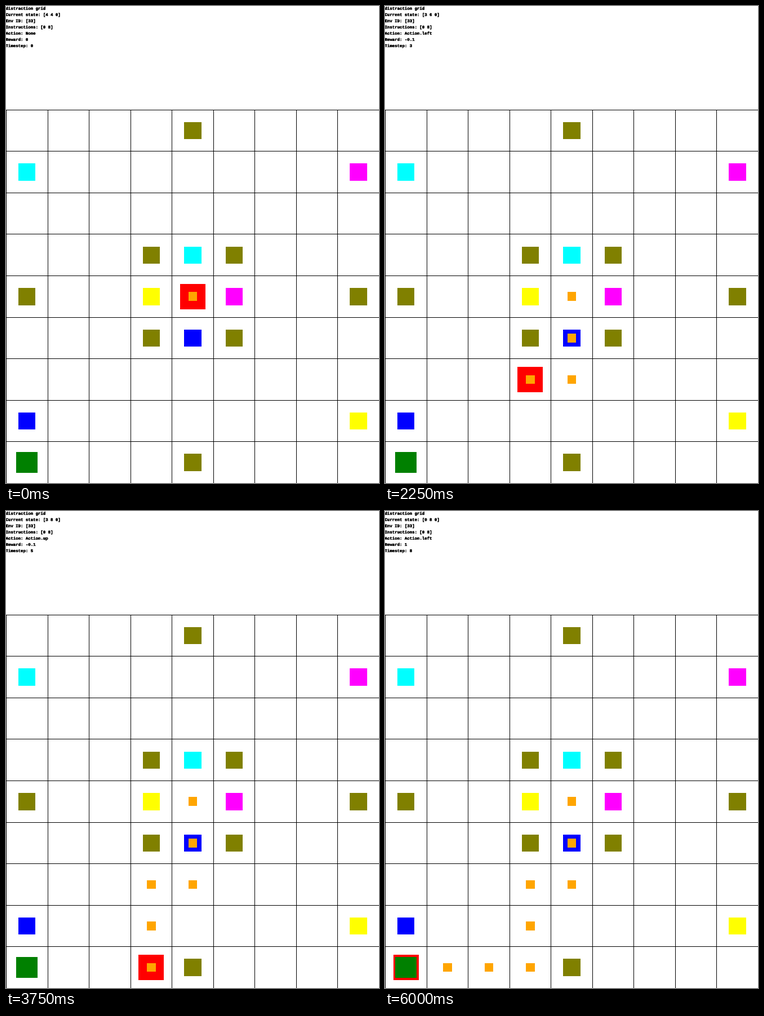
Write a matplotlib script that moves like this. It is 662 px wide and 846 px high and loops after 6750 ms.

```python
import math

import matplotlib.pyplot as plt
from matplotlib.animation import FuncAnimation
from matplotlib.patches import Rectangle
from matplotlib.patheffects import withStroke

W, H, DPI = 662, 846, 64
N = 9                # cells per side
CELL = 73.545        # cell size in pixels
TOP = 2.5 * CELL     # grid offset below the text
FONT_PX = CELL / 10

PATH = [(4, 4), (4, 5), (4, 6), (3, 6), (3, 7), (3, 8), (2, 8), (1, 8), (0, 8)]
GOAL = (0, 8)
MOVES = {(0, 1): "up", (-1, 0): "left"}
OBJECTS = {
    "#808000": [(4, 0), (3, 3), (5, 3), (0, 4), (8, 4), (3, 5), (5, 5), (4, 8)],
    "#00ffff": [(0, 1), (4, 3)],
    "#ff00ff": [(8, 1), (5, 4)],
    "#ffff00": [(3, 4), (8, 7)],
    "#0000ff": [(4, 5), (0, 7)],
}

fig = plt.figure(figsize=(W / DPI, H / DPI), dpi=DPI, facecolor="white")
ax = fig.add_axes([0, 0, 1, 1])
ax.set_xlim(0, W)
ax.set_ylim(H, 0)
ax.axis("off")


def px(v):
    return math.floor(v + 0.5)


def box(x, y, w, h, color, z):
    return ax.add_patch(Rectangle((x, y), w, h, facecolor=color, linewidth=0,
                                  antialiased=False, zorder=z))


def bounds(cell, size):
    """Whole-pixel x, y, width and height of a square centred in a cell."""
    cx, cy = ((c + 0.5) * CELL for c in cell)
    half = size * CELL / 2
    x, y = px(cx - half), px(TOP + cy - half)
    return x, y, px(cx + half) + 1 - x, px(TOP + cy + half) + 1 - y


def square(cell, size, color, z):
    return box(*bounds(cell, size), color, z)


for i in range(N):
    box(px(i * CELL), px(TOP), 1, H, "black", 1)
    box(0, px(TOP + i * CELL), W, 1, "black", 1)

for color, cells in OBJECTS.items():
    for cell in cells:
        square(cell, 0.4, color, 2)

agent = square(PATH[0], 0.6, "#ff0000", 3)
trail = [square(cell, 0.2, "#ffa500", 4) for cell in PATH]
square(GOAL, 0.5, "#008000", 5)

labels = [
    ax.text(-0.4, 6.7 + k * 0.15 * CELL, "", family="Liberation Mono",
            weight="bold", size=FONT_PX * 72 / DPI, color="black",
            va="baseline", ha="left",
            path_effects=[withStroke(linewidth=0.3, foreground="black")])
    for k in range(7)
]


def status(step):
    x, y = PATH[step]
    if step == 0:
        action, reward = "None", "0"
    else:
        px0, py0 = PATH[step - 1]
        action = "Action." + MOVES[x - px0, y - py0]
        reward = "1" if (x, y) == GOAL else "-0.1"
    return [
        "distraction grid",
        f"Current state: [{x} {y} 0]",
        "Env ID: [33]",
        f"Instructions: [{GOAL[0]} {GOAL[1]}]",
        f"Action: {action}",
        f"Reward: {reward}",
        f"Timestep: {step}",
    ]


def update(step):
    agent.set_bounds(*bounds(PATH[step], 0.6))
    for i, mark in enumerate(trail):
        mark.set_visible(i <= step)
    for label, line in zip(labels, status(step)):
        label.set_text(line)
    return [agent, *trail, *labels]


anim = FuncAnimation(fig, update, frames=len(PATH), interval=750, repeat=True,
                     repeat_delay=0, blit=False)
plt.show()
```
